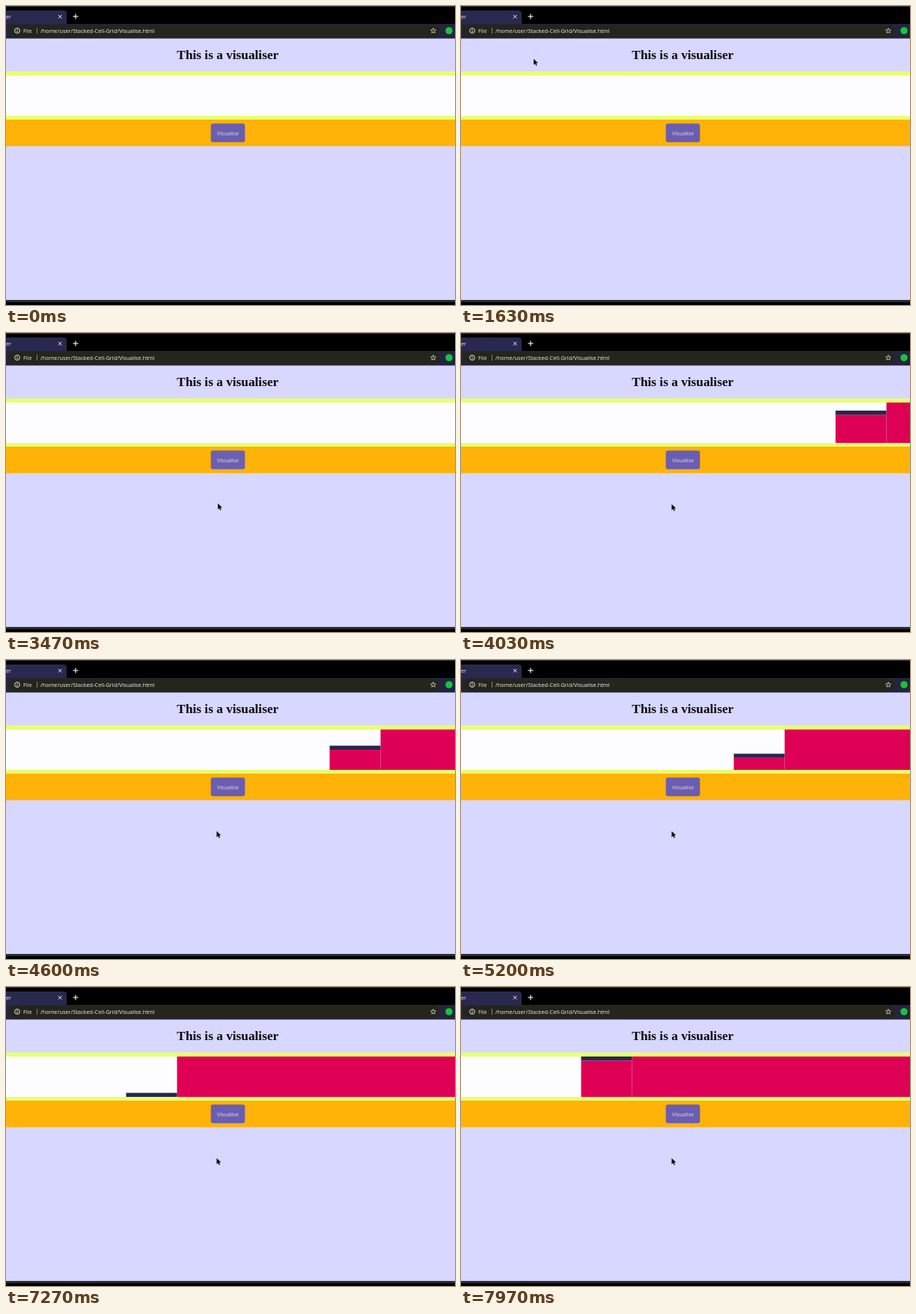
Write an HTML page with a canvas that moves like this. It is 600x400 px and loops after 8 s.

```html
<!DOCTYPE html>
<html lang="en">
<head>
<meta charset="utf-8">
<title>Visualiser</title>
<style>
  html, body { margin: 0; width: 100%; height: 100%; overflow: hidden; background: #000; }
  canvas { display: block; }
</style>
</head>
<body>
<canvas id="stage" width="600" height="400"></canvas>
<script>
const ctx = document.getElementById('stage').getContext('2d');
const LOOP = 8000;
const UI = '"Open Sans", sans-serif';

const GRID = { right: 636.5, top: 93, cellW: 68, cellH: 5.4, rows: 10 };
const FILL = { start: 2700, step: 75.5, visibleFrom: 3670 };

// Pointer path: [time, x, y]
const POINTER = [
  [30, 486, 396], [250, 380, 210], [470, 193, 40],
  [1370, 193, 40], [1560, 60, 22], [1860, 322, 366], [2170, 298, 186],
  [2450, 294.5, 163], [3030, 294.5, 163], [3220, 335, 196], [3500, 281.5, 229]
];

const clamp = v => Math.max(0, Math.min(1, v));
const ease = v => v * v * (3 - 2 * v);
const lerp = (a, b, k) => a + (b - a) * k;
const mix = (a, b, k) => `rgb(${a.map((v, i) => Math.round(lerp(v, b[i], k)))})`;

function rect(color, x, y, w, h) {
  ctx.fillStyle = color;
  ctx.fillRect(x, y, w, h);
}

function roundRect(color, x, y, w, h, radius) {
  ctx.beginPath();
  ctx.roundRect(x, y, w, h, radius);
  ctx.fillStyle = color;
  ctx.fill();
}

function text(str, x, y, font, color, align = 'left') {
  ctx.font = font;
  ctx.fillStyle = color;
  ctx.textAlign = align;
  ctx.fillText(str, x, y);
}

function stroke(points, color, width = 1) {
  ctx.beginPath();
  points.forEach(([x, y]) => ctx.lineTo(x, y));
  ctx.strokeStyle = color;
  ctx.lineWidth = width;
  ctx.stroke();
}

function circle(x, y, r) {
  ctx.beginPath();
  ctx.arc(x, y, r, 0, Math.PI * 2);
}

function drawStar(cx, cy) {
  ctx.beginPath();
  for (let i = 0; i < 10; i++) {
    const a = i * Math.PI / 5 - Math.PI / 2, r = i % 2 ? 1.6 : 3.6;
    ctx.lineTo(cx + r * Math.cos(a), cy + r * Math.sin(a));
  }
  ctx.closePath();
  ctx.strokeStyle = '#ddd';
  ctx.lineWidth = 0.8;
  ctx.stroke();
}

function drawBrowser() {
  rect('#000', 0, 0, 600, 400);
  rect('#3c3c3c', 0, 0, 600, 1);
  roundRect('#29294f', -10, 6, 91, 24, 4);
  rect('#24243c', 0, 24, 600, 20);
  roundRect('#25251c', 4, 25, 575, 17, 8);

  text('er', 0, 17, '7.3px ' + UI, '#e4e4e4');
  stroke([[70, 12], [74.5, 16.5]], '#eee');
  stroke([[74.5, 12], [70, 16.5]], '#eee');
  stroke([[89.5, 14], [96.5, 14]], '#eee', 1.2);
  stroke([[93, 10.5], [93, 17.5]], '#eee', 1.2);

  circle(15, 33, 3.4);
  ctx.strokeStyle = '#e4e4e4';
  ctx.lineWidth = 1;
  ctx.stroke();
  stroke([[15, 32.5], [15, 35]], '#e4e4e4');
  rect('#e4e4e4', 14.5, 30.8, 1, 1);
  text('File', 23, 35.7, '7.3px ' + UI, '#e4e4e4');
  rect('#999', 41, 29, 0.8, 8);
  text('/home/user/Stacked-Cell-Grid/Visualise.html', 46, 35.7, '7.4px ' + UI, '#f0f0f0');
  drawStar(571, 33.2);
  circle(592, 33, 4.8);
  ctx.fillStyle = '#18c43c';
  ctx.fill();
}

function drawPage() {
  rect('#d7d7ff', 0, 43.5, 600, 350);
  rect('#4a4a4a', 0, 395, 600, 1);
  text('This is a visualiser', 296.3, 71, 'bold 17.3px "Liberation Serif", serif', '#0a0a0a', 'center');
  rect('#e9ff70', 0, 87.5, 600, 64.5);
  rect('#fdfdff', 0, 93, 600, 54);
  rect('#ffb208', 0, 152, 600, 35.5);
}

function drawCells(t) {
  if (t < FILL.visibleFrom) return;
  const { right, top, cellW, cellH, rows } = GRID;
  const count = Math.floor((t - FILL.start) / FILL.step);
  const col = Math.floor(count / rows), row = count % rows;
  const bottom = top + rows * cellH;
  const x = right - (col + 1) * cellW;
  const y = bottom - (row + 1) * cellH;
  rect('#de0054', x + cellW, top, col * cellW, bottom - top);
  rect('#de0054', x, y + cellH, cellW, row * cellH);
  rect('#26264f', x, y, cellW, cellH);
}

function drawButton(t) {
  const hover = ease(clamp((t - 2250) / 400)) - ease(clamp((t - 3100) / 400));
  roundRect('#6c60b2', 273.7, 157.3, 45.6, 25, 3);
  roundRect(mix([106, 94, 178], [255, 248, 172], hover), 274.4, 158, 44.2, 23.6, 2.4);
  text('Visualise', 296.5, 172.5, '7.2px ' + UI, mix([228, 218, 226], [128, 116, 180], hover), 'center');
}

function drawPointer(t) {
  if (t < POINTER[0][0]) return;
  let i = POINTER.length - 1;
  while (POINTER[i][0] > t) i--;
  const a = POINTER[i], b = POINTER[i + 1] || a;
  const k = a === b ? 0 : ease((t - a[0]) / (b[0] - a[0]));
  ctx.save();
  ctx.translate(lerp(a[1], b[1], k), lerp(a[2], b[2], k));
  ctx.beginPath();
  [[0, 0], [0, 8], [1.9, 6.4], [3.2, 9.2], [4.5, 8.6], [3.3, 5.8], [5.8, 5.6]]
    .forEach(([x, y]) => ctx.lineTo(x, y));
  ctx.closePath();
  ctx.strokeStyle = '#d8d8d8';
  ctx.lineWidth = 1;
  ctx.stroke();
  ctx.fillStyle = '#111';
  ctx.fill();
  ctx.restore();
}

function frame(now) {
  const t = now % LOOP;
  drawBrowser();
  drawPage();
  drawCells(t);
  drawButton(t);
  drawPointer(t);
  requestAnimationFrame(frame);
}
requestAnimationFrame(frame);
</script>
</body>
</html>
```
